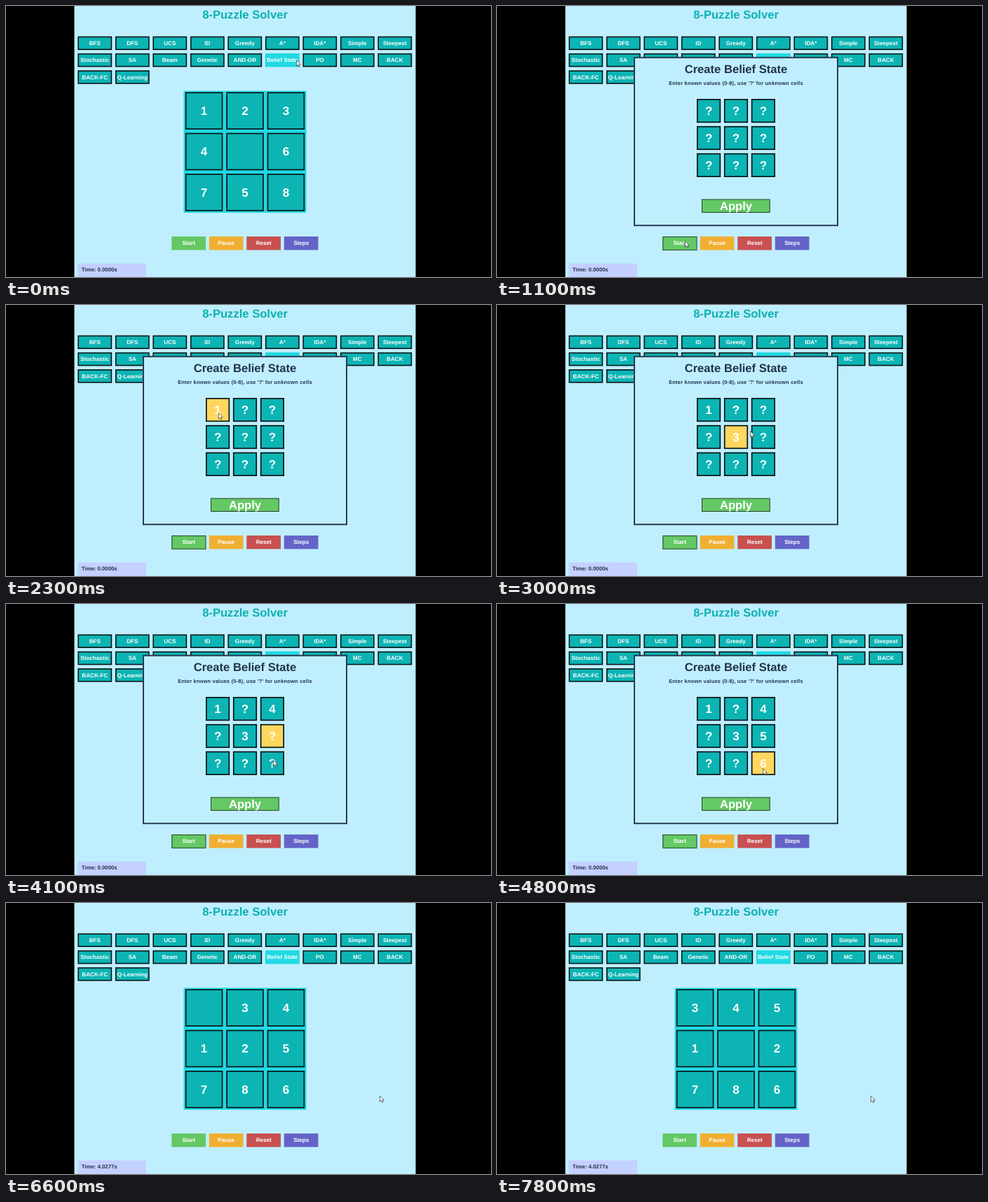
An HTML page for the animation above (8000 ms loop, 692x388 px).

```html
<!DOCTYPE html>
<html lang="en">
<head>
<meta charset="utf-8">
<title>8-Puzzle Solver</title>
<style>
  html, body { margin: 0; width: 100%; height: 100%; overflow: hidden; background: #000; }
  svg { display: block; width: 692px; height: 388px; }
  text {
    font-family: "Liberation Sans", Arial, sans-serif;
    font-weight: bold;
    text-rendering: geometricPrecision;
  }
</style>
</head>
<body>
<svg id="stage" viewBox="0 0 692 388"></svg>
<script>
const LOOP = 8000, STEP = 100;
const BG = '#bfefff', TEAL = '#0cb4b4', CYAN = '#20d9e2', INK = '#22324a',
      GREEN = '#64c864', YELLOW = '#ffd75f';
const stage = document.getElementById('stage');

function add(tag, attrs, parent = stage) {
  const node = document.createElementNS('http://www.w3.org/2000/svg', tag);
  for (const key in attrs) node.setAttribute(key, attrs[key]);
  parent.appendChild(node);
  return node;
}

// The border is drawn inside the box.
function box(x, y, width, height, fill, parent, border = 0, stroke = '#0a1416') {
  const b = border / 2;
  return add('rect', {
    x: x + b, y: y + b, width: width - border, height: height - border,
    fill, stroke: border ? stroke : 'none', 'stroke-width': border
  }, parent);
}

function label(str, x, cy, size, fill, parent, anchor = 'middle') {
  const node = add('text', {
    x, y: cy + size * 0.344, 'font-size': size, fill, 'text-anchor': anchor
  }, parent);
  node.textContent = str;
  return node;
}

function grid(cx, cy, pitch, size, parent) {
  return Array.from({ length: 9 }, (_, i) => {
    const x = cx + (i % 3 - 1) * pitch, y = cy + (Math.floor(i / 3) - 1) * pitch;
    return {
      rect: box(x - size / 2, y - size / 2, size, size, TEAL, parent, 1.7),
      text: label('', x, y, 17, '#fff', parent)
    };
  });
}

// Window and algorithm buttons
box(97.5, 0, 487, 388, BG);
label('8-Puzzle Solver', 341, 12.5, 16.6, '#0cb0b2');
const algorithms = ['BFS', 'DFS', 'UCS', 'ID', 'Greedy', 'A*', 'IDA*', 'Simple', 'Steepest',
  'Stochastic', 'SA', 'Beam', 'Genetic', 'AND-OR', 'Belief State', 'PO', 'MC', 'BACK',
  'BACK-FC', 'Q-Learning'];
algorithms.forEach((name, i) => {
  const x = 102.4 + (i % 9) * 53.5, y = 43.5 + Math.floor(i / 9) * 24.3;
  const active = name === 'Belief State';
  box(x, y, 48.8, 19.5, active ? CYAN : TEAL, stage, active ? 0 : 1.6);
  label(name, x + 24.4, y + 9.8, 8.1, '#fff');
});

// Board
box(253.5, 121.5, 175, 174.5, CYAN);
const tiles = grid(341, 208.5, 58.4, 53.6);

// Controls
const controls = [['Start', GREEN], ['Pause', '#f0af32'], ['Reset', '#c85050'], ['Steps', '#6464c8']];
controls.forEach(([name, color], i) => {
  const x = 236.3 + i * 53.5;
  box(x, 330, 48.7, 19.4, color);
  label(name, x + 24.4, 339.6, 8.1, '#fff');
});
const hover = box(236.3, 330, 49.2, 19.8, 'none', stage, 1, '#26402c');
box(102.4, 368.6, 97.5, 19.4, '#c4d0ff');
const clock = label('', 107.7, 377.6, 7.8, INK, stage, 'start');

// Dialog
const dialog = add('g', {});
box(195, 72.8, 292, 242.4, BG, dialog, 2, '#2a3b52');
label('Create Belief State', 341, 90, 16.6, INK, dialog);
label("Enter known values (0-8), use '?' for unknown cells", 341, 110.6, 7.5, INK, dialog)
  .setAttribute('letter-spacing', 0.2);
const cells = grid(341, 189, 38.9, 34.2, dialog);
box(292, 276.5, 97.7, 19.5, GREEN, dialog, 1, '#26402c');
label('Apply', 341, 286.2, 16.6, '#fff', dialog);

const pointer = add('path', {
  d: 'M.5 .5V9L2.4 7.3L3.8 10.3L5.1 9.7L3.8 6.8H6.4Z',
  fill: '#fff', stroke: '#2b3438', 'stroke-width': 0.7
});

// Timeline
const OPEN = 900, CLOSE = 5500;
const entries = [ // cell, selected at, typed at, value
  [0, 2000, 2300, '1'], [4, 2700, 2900, '3'], [2, 3300, 3600, '4'],
  [5, 3800, 4300, '5'], [8, 4500, 4700, '6']
];
const moves = [[6000, 4], [6300, 3], [6600, 0], [6900, 1], [7200, 2], [7500, 5], [7800, 4]];
const path = [ // time, x, y
  [0, 414, 77], [100, 414, 77], [500, 276, 331], [700, 268, 336], [1600, 268, 336],
  [1900, 302, 153], [2400, 303, 154], [2700, 344, 190], [2900, 346, 190], [3000, 361, 180],
  [3300, 380, 151], [3600, 380, 151], [3800, 381, 189], [3900, 381, 190], [4100, 381, 223],
  [4500, 379, 233], [4800, 379, 235], [5100, 358, 287], [5200, 358, 288], [5400, 358, 288],
  [5700, 533, 275.5], [LOOP, 533, 275.5]
];

function pointerAt(t) {
  const i = path.findIndex(p => p[0] > t);
  const [t0, x0, y0] = path[i - 1], [t1, x1, y1] = path[i];
  const k = (t - t0) / (t1 - t0);
  return [x0 + (x1 - x0) * k, y0 + (y1 - y0) * k];
}

function boardAt(t) {
  if (t < CLOSE) return [...'1234 6758'];
  const board = [...'1 4235786'];
  for (const [time, to] of moves) {
    if (t < time) break;
    board[board.indexOf(' ')] = board[to];
    board[to] = ' ';
  }
  return board;
}

function draw(t) {
  const open = t >= OPEN && t < CLOSE;
  dialog.style.display = open ? '' : 'none';
  hover.style.display = t >= 600 && t < CLOSE ? '' : 'none';
  clock.textContent = t < CLOSE ? 'Time: 0.0000s' : 'Time: 4.0277s';
  boardAt(t).forEach((value, i) => { tiles[i].text.textContent = value; });

  const selected = entries.filter(e => t >= e[1]).pop();
  cells.forEach(({ rect, text }, i) => {
    const entry = entries.find(e => e[0] === i);
    text.textContent = entry && t >= entry[2] ? entry[3] : '?';
    rect.setAttribute('fill', selected && selected[0] === i ? YELLOW : TEAL);
  });
  pointer.setAttribute('transform', `translate(${pointerAt(t)})`);
}

const start = performance.now();
function tick() {
  const t = (performance.now() - start) % LOOP;
  draw(Math.floor(t / STEP) * STEP);
  requestAnimationFrame(tick);
}
tick();
</script>
</body>
</html>
```
